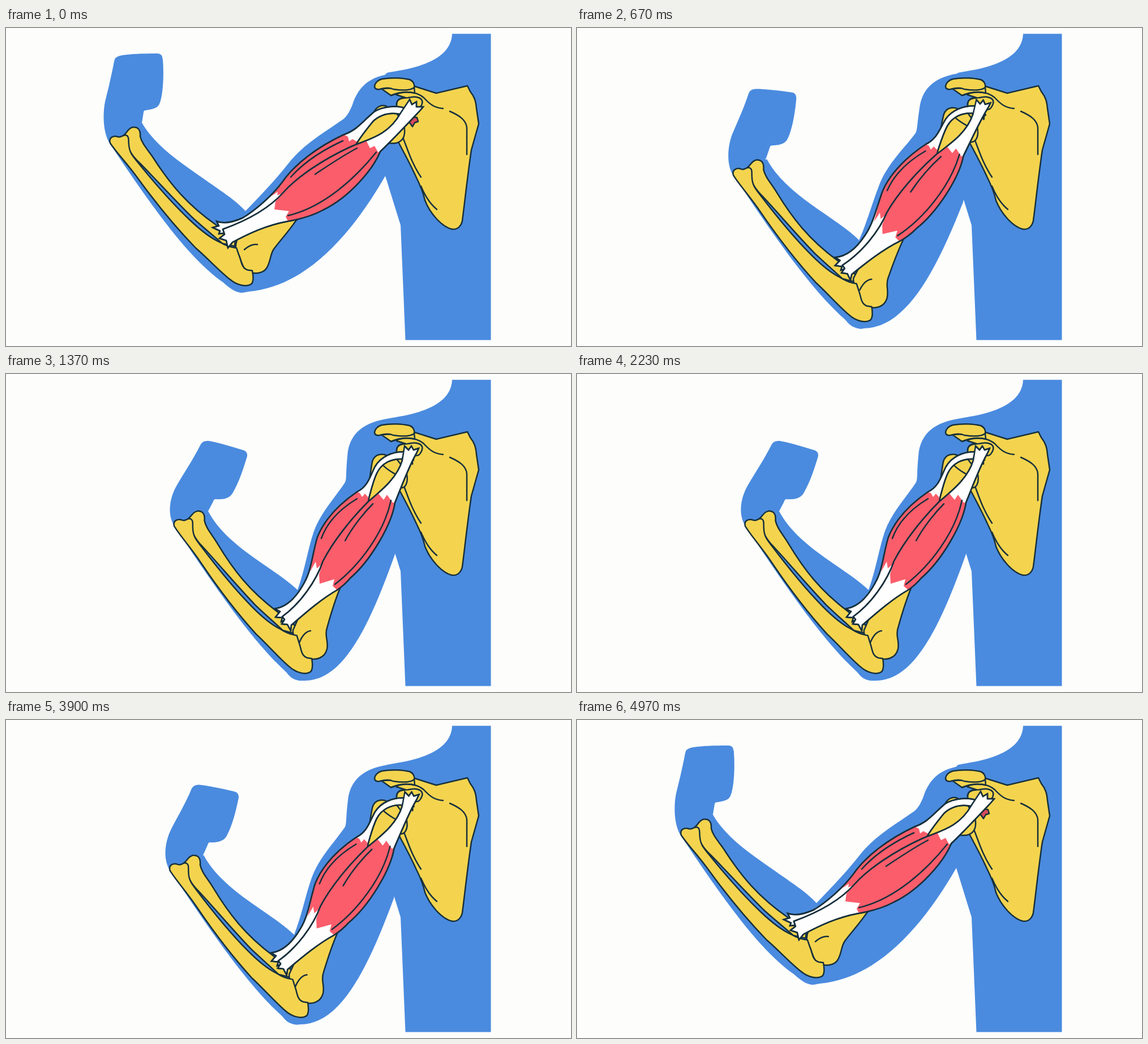
An HTML page for the animation above (5 s loop, 998 px wide and 561 px high).

```html
<!DOCTYPE html>
<html lang="en">
<head>
<meta charset="utf-8">
<title>Arm flexion</title>
<style>
  html, body { margin: 0; width: 100%; height: 100%; overflow: hidden; background: #fdfdfc; }
  svg { display: block; width: 100vw; height: 100vh; }
  path { stroke-linecap: round; stroke-linejoin: round; }
  .flesh { fill: #4a8bdf; }
  .bone { fill: #f4d44e; stroke: #17303c; stroke-width: 2.5; }
  .tendon { fill: #fefefe; stroke: #17303c; stroke-width: 2.5; stroke-linejoin: miter; }
  .belly { fill: #fb5d6b; }
  .scrap { fill: #d94a5a; stroke: #17303c; stroke-width: 2.5; }
  .line { fill: none; stroke: #17303c; stroke-width: 2.5; }
</style>
</head>
<body>
<svg id="stage" viewBox="0 0 998 561"></svg>
<script>
const LOOP = 5000;
const SHOULDER = [711, 139], ELBOW = [428, 430];
const UPPER_TURN = -18.2 * Math.PI / 180, FORE_TURN = 2 * Math.PI / 180;
const stage = document.getElementById('stage');
const moving = [];

function rotate([x, y], [cx, cy], angle) {
  const c = Math.cos(angle), s = Math.sin(angle), dx = x - cx, dy = y - cy;
  return [cx + dx * c - dy * s, cy + dx * s + dy * c];
}

// Each frame maps resting coordinates to the pose at progress p, and back.
const upper = {
  to: (pt, p) => rotate(pt, SHOULDER, UPPER_TURN * p),
  from: (pt, p) => rotate(pt, SHOULDER, -UPPER_TURN * p)
};
const fore = {
  to(pt, p) {
    const e = upper.to(ELBOW, p), r = rotate(pt, ELBOW, FORE_TURN * p);
    return [r[0] + e[0] - ELBOW[0], r[1] + e[1] - ELBOW[1]];
  },
  from(pt, p) {
    const e = upper.to(ELBOW, p);
    return rotate([pt[0] - e[0] + ELBOW[0], pt[1] - e[1] + ELBOW[1]], ELBOW, -FORE_TURN * p);
  }
};

function still(cls, d) {
  const el = document.createElementNS('http://www.w3.org/2000/svg', 'path');
  el.setAttribute('class', cls);
  el.setAttribute('d', d);
  stage.append(el);
  return el;
}

const PAIR = /(-?[\d.]+),(-?[\d.]+)/g;
const points = d => [...d.matchAll(PAIR)].map(m => [+m[1], +m[2]]);

// Path that blends from one pose to the other inside a turning frame.
function morph(cls, frame, open, bent, lag = 1) {
  const a = points(open);
  const b = bent ? points(bent).map(pt => frame.from(pt, 1)) : a;
  const el = still(cls, open);
  moving.push(p => {
    const q = Math.pow(p, lag);
    let i = 0;
    el.setAttribute('d', open.replace(PAIR, () => {
      const s = a[i], t = b[i++];
      const pt = frame.to([s[0] + (t[0] - s[0]) * q, s[1] + (t[1] - s[1]) * q], p);
      return pt[0].toFixed(2) + ',' + pt[1].toFixed(2);
    }));
  });
}

// White head with a red belly inside one outline.
function muscle(outline, belly) {
  morph('tendon', upper, ...outline);
  morph('belly', upper, ...belly);
  morph('line', upper, ...outline.map(d => d.replace(/ Z$/, '')));
}

// Skin
still('flesh', 'M788,10.3 H856.5 V550.5 H705.5 L697,348 L670,261 L655,212 L668,84 L673,79 C700,74 786,65 788,10.3 Z');
morph('flesh', upper,
  'M673,82 C640,88 622,105 612,135 C606,150 602,155 597,160 C560,186 525,205 498,240 C470,275 445,300 423,323 L384,449 C395,459 405,467 418,467 L429,465 C530,456 610,365 670,261 L700,200 Z',
  'M673,79 C637,85 606,101 603,145 C600,175 602,185 599,191 C580,220 555,245 543,280 C533,310 528,345 515,381 L496,527 C502,536 510,541 523,541 L527,541 C595,541 640,450 687,318 L710,200 Z');
morph('flesh', fore,
  'M240,167 C262,205 300,232 345,263 C380,288 405,303 423,323 L440,420 L416,467 L412,466 C405,465 395,458 384,449 C330,412 270,335 181,200 L181,190 Z',
  'M357,242 C378,282 420,312 458,338 C480,353 500,367 515,381 L540,490 L523,541 L519,541 C510,540 502,532 496,527 C440,475 385,400 296,266 L296,250 Z');
morph('flesh', fore,
  'M240,167 L243,149 Q243,145 248,145 C260,143 268,141 271,134 C278,118 279,80 277,56 Q276,45 268,45 C240,45 215,46 201,49 Q192,51 191,59 C185,90 180,110 175,130 C171,150 171,180 181,200 L215,215 Z',
  'M357,242 L366,225 Q367,220 372,221 C390,222 397,216 401,209 C412,190 420,165 426,145 Q427,136 418,134 C395,127 375,121 358,118 Q348,117 344,124 C331,150 316,172 302,196 C292,212 283,243 296,266 L330,280 Z', 4.2);

// Shoulder blade
still('bone', 'M722,103 L760,115 L815,102 L820,112 C828,122 830,130 831,142 L835,169 L822,215 C815,262 810,310 806,340 C804,350 797,356 788,355 C768,350 748,325 740,304 C737,290 732,278 724,262 C714,240 703,220 694,203 C690,180 691,150 690,135 C690,126 697,123 706,123 L690,118 L700,106 Z');
still('bone', 'M663,107 L680,119 C694,113 708,111 722,115 L721,104 Z');
still('bone', 'M651,104 C651,98 656,92 664,90 C680,87 700,88 713,91 C720,94 722,100 721,105 C714,111 698,110 684,108 C674,103 664,107 660,108 C655,109 652,107 651,104 Z');
still('line', 'M784,147 C800,154 813,162 814,176 V223');
still('line', 'M680,119 C700,112 722,109 738,123 C750,136 758,141 772,142');
still('line', 'M699,188 C710,215 716,238 733,263');
still('line', 'M733,279 C740,296 750,311 761,320');
still('line', 'M690,136 C689,126 698,123 710,123 C730,118 740,126 733,138 C731,142 728,144 725,144');

// Arm bones
morph('bone', fore, 'M208,189 C215,184 215,177 224,175 C234,174 238,181 237,191 C240,205 252,216 262,232 C290,275 320,312 372,348 L405,372 L404,385 L382,380 C366,366 350,353 332,337 C300,306 264,266 236,238 C222,225 216,215 208,189 Z');
morph('bone', upper,
  'M512,340 L640,235 L676,203 C696,206 708,196 703,172 L690,150 L672,138 C664,135 655,138 650,148 L625,195 L520,270 L408,374 C404,385 406,395 412,402 C416,412 418,426 430,431 C440,434 454,433 460,424 C468,412 466,400 473,390 C485,374 500,358 512,340 Z',
  'M590,378 L670,240 L690,199 C706,206 712,192 707,172 L690,150 L668,142 C660,141 648,142 646,160 L640,200 L560,330 L507,452 C506,460 510,464 514,468 C516,482 520,497 534,502 C547,505 563,502 567,485 C570,470 562,462 567,448 C572,430 580,402 590,378 Z');
morph('line', upper, 'M421,391 C428,385 436,381 444,382', 'M518,474 C523,462 529,454 538,453');
morph('line', upper, 'M676,142 C684,146 690,150 698,153', 'M665,160 C672,168 680,172 688,177');
morph('bone', fore, 'M184,203 C181,193 190,189 198,192 C204,194 206,188 212,189 C218,191 216,198 217,206 C218,220 224,226 232,236 C262,273 290,306 325,339 C345,358 362,371 378,378 C388,384 396,387 407,388 C409,393 410,397 412,402 C416,412 416,424 427,427 L435,428 C437,438 437,447 434,451 C425,458 408,454 395,443 C375,427 356,406 335,388 C300,352 262,305 235,268 C215,240 195,220 184,203 Z');

// Muscle
morph('scrap', upper,
  'M711,162 L713,167 L718,174 L722,167 L728,165 L726,158 L718,157 Z',
  'M713,150 L714,152 L718,159 L718,153 L720,152 L719,149 L716,147 Z');

muscle([
  'M707,142 C690,136 665,138 650,148 C630,165 620,180 597,188 C550,210 510,240 488,272 C470,296 440,322 418,335 C400,343 385,346 372,341 L376,349 L365,352 L378,358 L376,363 L388,362 C435,352 470,330 495,296 C520,268 565,238 614,212 L621,201 C630,187 640,175 648,165 C662,152 680,148 700,153 Z',
  'M703,137 C682,137 662,146 652,163 C643,180 640,198 620,208 C588,230 562,258 550,288 C541,318 540,345 527,368 C512,396 495,411 475,414 L484,419 L476,429 L488,430 L486,437 L495,433 C530,408 556,370 567,336 C585,300 617,262 639,232 L641,219 C645,205 648,190 655,175 C663,158 680,149 700,150 Z'
], [
  'M597,188 C550,210 510,240 488,272 L468,297 L480,289 L479,295 L494,290 C520,268 565,238 614,212 L621,201 L612,196 L606,200 L604,192 Z',
  'M620,208 C588,230 562,258 550,288 L537,349 L547,331 L549,343 L564,330 C585,300 617,262 639,232 L641,219 L634,211 L629,217 L625,210 Z'
]);
muscle([
  'M713,126 L717,135 L725,130 L725,139 L737,139 L731,146 C715,163 690,190 661,218 C647,252 604,300 560,321 C540,332 515,338 498,341 C460,348 430,362 400,378 L392,388 L389,375 L377,371 L386,364 L383,355 C430,338 465,318 490,290 C515,262 560,232 610,209 C640,196 675,190 697,150 Z',
  'M704,127 L711,134 L716,127 L720,134 L729,131 L725,140 C713,160 702,190 687,227 C681,267 643,330 608,360 C600,370 592,376 585,381 C555,398 525,425 504,443 L503,453 L497,442 L487,441 L492,433 L488,428 C520,405 548,365 560,330 C578,295 610,255 640,225 C670,200 692,180 700,152 Z'
], [
  'M661,218 C647,252 604,300 560,321 C540,332 515,338 498,341 L494,333 L500,323 L474,320 L476,306 L491,289 C515,262 560,232 610,209 L636,198 L643,212 L651,208 L657,219 Z',
  'M687,227 C681,267 643,330 608,360 C600,370 592,376 585,381 L577,374 L580,362 L554,370 L553,353 L561,329 C578,295 610,255 640,225 L657,210 L667,222 L673,213 L683,227 Z'
]);
morph('line', upper, 'M595,199 C560,215 528,235 503,263', 'M620,220 C590,238 567,262 557,290');
morph('line', upper, 'M620,212 C595,225 570,242 546,258', 'M648,229 C632,245 612,270 599,294');
morph('line', upper, 'M654,219 C618,264 562,316 498,331', 'M680,223 C668,280 624,338 581,371');

function ease(u) {
  u = Math.min(1, Math.max(0, u));
  return u < 0.5 ? 16 * u ** 5 : 1 - 16 * (1 - u) ** 5;
}

function draw(time) {
  const t = time % LOOP;
  const p = ease(t / 1125) - ease((t - 3510) / 1190);
  for (const update of moving) update(Math.max(0, p));
}

function tick() {
  draw(performance.now());
  requestAnimationFrame(tick);
}
tick();
</script>
</body>
</html>
```
